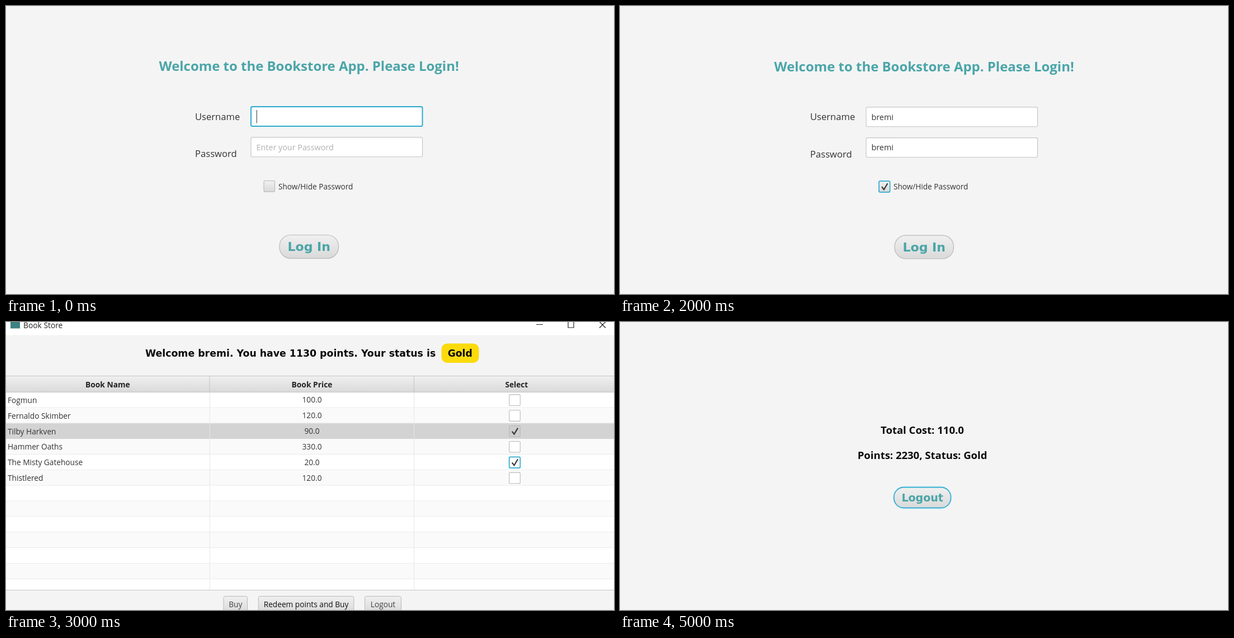
Animation, 1087 px wide and 515 px high, one loop 6 s. Source, as an HTML page:

```html
<!DOCTYPE html>
<html lang="en">
<head>
<meta charset="utf-8">
<title>Bookstore</title>
<style>
  html, body { margin: 0; width: 100%; height: 100%; overflow: hidden; background: #f4f4f4; }
  svg { display: block; width: 1087px; height: 515px; }
  text { font-family: "Open Sans", "Noto Sans", sans-serif; white-space: pre; }
  .wide { font-family: "DejaVu Sans", sans-serif; font-weight: bold; }
  .bold { font-weight: bold; }
  .mid { text-anchor: middle; }
  .error { font-style: italic; }
</style>
</head>
<body>
<svg id="stage" viewBox="0 0 1087 515">
  <defs>
    <linearGradient id="metal" x2="0" y2="1">
      <stop stop-color="#f0f0f0"/><stop offset="1" stop-color="#d9d9d9"/>
    </linearGradient>
    <linearGradient id="shade" x2="0" y2="1">
      <stop stop-color="#f1f1f1"/><stop offset=".1" stop-color="#fff"/>
    </linearGradient>
  </defs>
</svg>
<script>
const TEAL = '#4aa5a8', FOCUS = '#2cabcf', EDGE = '#b9b9b9', METAL = 'url(#metal)';
const USER = 'bremi';
const STEP = 1000;

const text = (x, y, size, str, fill = '#333', cls = '') =>
  `<text x="${x}" y="${y}" font-size="${size}" fill="${fill}" class="${cls}">${str}</text>`;

const rect = (x, y, w, h, fill, stroke = 'none', r = 0, line = 1) =>
  `<rect x="${x}" y="${y}" width="${w}" height="${h}" rx="${r}" fill="${fill}" stroke="${stroke}" stroke-width="${line}"/>`;

const path = (d, stroke, line = 1) =>
  `<path d="${d}" fill="none" stroke="${stroke}" stroke-width="${line}"/>`;

function pill(x, y, w, h, label, size, focus) {
  const glow = focus ? rect(x, y, w, h, 'none', '#c9eaf3', h / 2, 4) : '';
  return glow + rect(x, y, w, h, METAL, focus ? FOCUS : EDGE, h / 2 - 1, focus ? 1.6 : 1.2) +
    text(x + w / 2, y + h / 2 + size * .365, size, label, TEAL, 'wide mid');
}

function field(y, { value, hint, focus }) {
  return rect(438, y, 306.5, 35, 'url(#shade)', focus ? FOCUS : '#c3c3c3', 2.5, focus ? 2 : 1.1) +
    (focus ? path(`M448.3 ${y + 6}v23.5`, '#777', 1.6) : '') +
    text(447.5, y + 23, 14.35, value || hint, value ? '#333' : '#b0b0b0');
}

function checkBox(x, y, { checked, focus, fill = METAL }) {
  return rect(x, y, 19.6, 19.6, fill, focus ? FOCUS : EDGE, 2, focus ? 1.7 : 1.1) +
    (checked ? path(`M${x + 5} ${y + 10}l3.8 5l6.6 -11`, '#383838', 2.2) : '');
}

function login(dx, dy, { user = {}, pass = {}, check = {}, error = '', focus = false }) {
  return `<g transform="translate(${dx} ${dy})">` +
    text(273.5, 116, 23.95, 'Welcome to the Bookstore App. Please Login!', TEAL, 'bold') +
    text(338, 203.7, 16.6, 'Username') +
    text(338, 270, 16.6, 'Password') +
    field(180, { hint: 'Enter your Username', ...user }) +
    field(234.8, { hint: 'Enter your Password', ...pass }) +
    checkBox(461, 312.5, check) +
    text(487, 327.8, 13.6, 'Show/Hide Password') +
    text(541.5, 366, 11.1, error, '#c8201e', 'error mid') +
    pill(489, 409.5, 105.5, 41.8, 'Log In', 22, focus) + '</g>';
}

function shop() {
  const books = [
    ['Fogmun', '100.0'], ['Fernaldo Skimber', '120.0'], ['Tilby Harkven', '90.0'],
    ['Hammer Oaths', '330.0'], ['The Misty Gatehouse', '20.0'], ['Thistlered', '120.0']
  ];
  const top = 125.6, pitch = 27.85, chosen = 2;
  let out = rect(0, 0, 1087, 23.5, '#fff') + rect(8, -4, 17, 15.5, '#3d8283') +
    text(31, 10.5, 13.8, 'Book Store', '#222') +
    path('M948 4.5h12M1005 -.5h10v10.5h-10zM1061 -.5l11 11m0 -11l-11 11', '#222', 1.2) +
    text(249, 61.5, 17.33, `Welcome ${USER}. You have 1130 points. Your status is`, '#0a0a0a', 'wide') +
    rect(778.5, 38.5, 67, 34.5, '#fbdb0c', 'none', 10) +
    text(811.7, 61.5, 17.2, 'Gold', '#0a0a0a', 'wide mid');

  for (let i = 0; i < 13; i++) {
    const y = top + i * pitch, h = Math.min(pitch, 479.5 - y);
    out += rect(0, y, 1087, h, i === chosen ? '#d3d3d3' : i % 2 ? '#fafafa' : '#fff');
    if (i < 12 && i !== chosen) out += path(`M0 ${y + h - .5}H1087`, '#e9e9e9');
  }
  out += path(`M364.3 ${top}V479.5M729.7 ${top}V479.5`, '#e6e6e6');

  books.forEach(([name, price], i) => {
    const y = top + i * pitch;
    out += text(3, y + 19.3, 13.7, name) + text(547, y + 18.8, 13.7, price, '#333', 'mid') +
      checkBox(899.7, y + 4.3, {
        checked: i === chosen || i === 4, focus: i === 4, fill: i === chosen ? '#cecece' : '#fff'
      });
  });

  out += rect(0, 96.5, 1087, 29, METAL) +
    path('M0 96.5H1087M0 125.5H1087M364 97V125M729.5 97V125', '#c4c4c4') +
    text(181.8, 117, 13.8, 'Book Name', '#222', 'bold mid') +
    text(547, 117, 13.8, 'Book Price', '#222', 'bold mid') +
    text(912.8, 117, 13.6, 'Select', '#222', 'bold mid') +
    rect(0, 479.5, 1087, 36, '#f4f4f4') + path('M0 479.5H1087', '#c4c4c4');

  const button = (x, w, label, fill) =>
    rect(x, 490.5, w, 30, METAL, EDGE, 3) + text(x + w / 2, 510, 13.7, label, fill, 'mid');
  return out + button(389, 42.5, 'Buy', '#444') +
    button(451.3, 170.5, 'Redeem points and Buy', '#111') +
    button(641.5, 65, 'Logout', '#444');
}

function receipt(x, y, buttonY, cost, points) {
  return text(x, y, 18.55, `Total Cost: ${cost}`, '#0a0a0a', 'bold mid') +
    text(x + .2, y + 45.2, 18.5, `Points: ${points}, Status: Gold`, '#0a0a0a', 'bold mid') +
    pill(x - 50.5, buttonY, 101.5, 36.8, 'Logout', 19, true);
}

const typed = { value: USER };
const scenes = [
  login(0, 0, { user: { hint: '', focus: true } }),
  login(4.4, 0, { error: 'Invalid Username or Password!', focus: true }),
  login(2, .7, { user: typed, pass: typed, check: { checked: true, focus: true } }),
  shop(),
  receipt(543.8, 203, 298, '98.0', '1010'),
  receipt(540.4, 199.6, 295.6, '110.0', '2230')
];

const stage = document.getElementById('stage');
stage.insertAdjacentHTML('beforeend', scenes.map(s => `<g class="scene" display="none">${s}</g>`).join(''));
const groups = [...stage.querySelectorAll('.scene')];
const start = performance.now();
let shown = -1;

function draw() {
  const now = Math.floor((performance.now() - start) / STEP) % groups.length;
  if (now !== shown) {
    groups.forEach((g, i) => g.setAttribute('display', i === now ? 'inline' : 'none'));
    shown = now;
  }
  requestAnimationFrame(draw);
}
draw();
</script>
</body>
</html>
```
